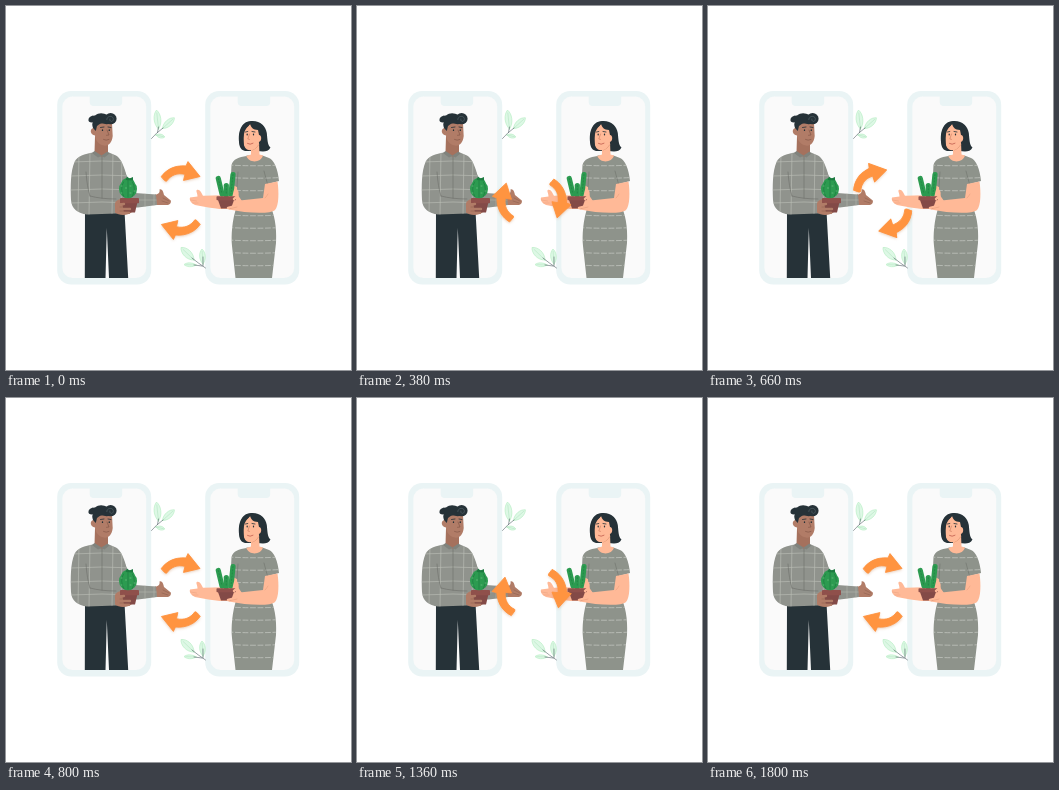
An HTML page with a canvas for the animation above (1820 ms loop, 345 by 364 pixels).

```html
<!DOCTYPE html>
<html lang="en">
<head>
<meta charset="utf-8">
<title>Plant swap</title>
<style>
  html, body { margin: 0; width: 100%; height: 100%; overflow: hidden; background: #fff; }
  canvas { display: block; width: 345px; height: 364px; }
</style>
</head>
<body>
<canvas id="stage"></canvas>
<script>
const W = 345, H = 364;
const LOOP = 1820, SPIN = 800, SECOND = 1000, STEP = 20;
const CX = 174.7, CY = 194.5;
const INK = '#263238', FRAME = '#eaf4f5', SCREEN = '#fafafa', ORANGE = '#ff9440';
const SHIRT = '#90938d', DRESS = '#8e938b', BROWN = '#b17c67', PEACH = '#ffb997';
const BROWN_LINE = '#7f5344', PEACH_LINE = '#e39a78';
const GREEN = '#2c9b50', DARK_GREEN = '#1d7a40', POT = '#834a47', RIM = '#8f504b';

const stage = document.getElementById('stage');
const scale = window.devicePixelRatio || 1;

function setup(canvas) {
  canvas.width = W * scale;
  canvas.height = H * scale;
  const c = canvas.getContext('2d');
  c.scale(scale, scale);
  c.lineCap = c.lineJoin = 'round';
  return c;
}

const view = setup(stage);
const scene = document.createElement('canvas');
const g = setup(scene);

function fill(d, color) {
  g.fillStyle = color;
  g.fill(new Path2D(d));
}

function line(d, color, width = 0.7, dash = []) {
  g.strokeStyle = color;
  g.lineWidth = width;
  g.setLineDash(dash);
  g.stroke(new Path2D(d));
}

function oval(x, y, rx, ry, color) {
  g.fillStyle = color;
  g.beginPath();
  g.ellipse(x, y, rx, ry, 0, 0, Math.PI * 2);
  g.fill();
}

function box(x, y, w, h, r, color) {
  g.fillStyle = color;
  g.beginPath();
  g.roundRect(x, y, w, h, r);
  g.fill();
}

function inside(d, draw) {
  g.save();
  g.clip(new Path2D(d));
  draw();
  g.restore();
}

function phone(x) {
  box(x, 85, 94, 193.5, 14, FRAME);
  box(x + 5.2, 90.5, 83.8, 181.5, 10, SCREEN);
  box(x + 32.5, 88, 32.5, 12, [0, 0, 4, 4], FRAME);
}

function leaf(x, y, length, width, turn) {
  g.save();
  g.translate(x, y);
  g.rotate(turn * Math.PI / 180);
  const d = `M0 0C${-width} ${-length * 0.3} ${-width * 0.8} ${-length * 0.8} 0 ${-length}` +
    `C${width * 0.8} ${-length * 0.8} ${width} ${-length * 0.3} 0 0Z`;
  fill(d, '#ddf8e5');
  line(d, '#b5edc2', 0.6);
  line(`M0 0V${-length * 0.85}`, '#a5dcb4', 0.4);
  g.restore();
}

function sprigs() {
  leaf(152.5, 123, 19, 5, -6);
  leaf(156.5, 122.5, 16, 4.6, 48);
  leaf(150, 129, 9, 2.8, 103);
  line('M145.5 132.5Q150 127 157 122M151.5 126.5L152.5 121', '#56636a', 0.6);
  leaf(188, 254, 18, 5.6, -46);
  leaf(197, 258, 15, 4.2, -4);
  leaf(190, 259, 12, 2.9, -88);
  line('M199.5 262Q192 257 186 252M197 260V251M196 260L188 259', '#56636a', 0.6);
}

function man() {
  fill('M79 205H118.5L122.2 272H103L100.8 222L99.5 272H78.8Z', INK);

  // reaching arm
  fill('M149 188.5C153 188.5 154 186 153.5 183.5C156 182.5 157.5 186 158 189L164.8 194.5C165.5 197 163.5 199.3 160 199L149 199Z', BROWN);
  line('M157 192L163 195M156 195L162 197', BROWN_LINE, 0.4);
  const sleeve = 'M108 149C114 152 117 161 119.5 167L123.5 176L129 187L150 188.5L151 199L132 201.5L114 201Z';
  fill(sleeve, SHIRT);
  inside(sleeve, () => line('M132 194H152M139 186V203M148 186V203', '#b2b5ad', 0.6));

  // torso and bent arm
  const torso = 'M87 146.5C79 148 71 150 68.5 156C64.5 165 64.5 180 65 194C65.5 203 72 207.5 81 208.5L110 207.5L118.5 206.5L119.5 190L121 172C119 162 115 152 110 149.5L103 146.5Z';
  fill(torso, SHIRT);
  inside(torso, () => {
    const rows = [156, 170, 184, 197].map(y => `M64 ${y}Q96 ${y - 2} 128 ${y}`).join('');
    const columns = [73, 84, 107, 116].map(x => `M${x} 144L${x - 1} 210`).join('');
    line(rows + columns, '#babdb5', 0.65);
  });
  line('M96 150V192M80 166Q81 181 84 190M84 190Q95 193 110 193', '#6d706b', 0.6);

  // head
  fill('M89 130L88.5 147C93 151.5 99 151.5 102 147.5V134Z', '#a5715d');
  fill('M87.5 120C90 113 103 113 106 117L106.7 130C106 137 102 140.5 98 139.5C92 138.5 89.5 134 89 129.5C84.5 129 83 123 87.5 122Z', BROWN);
  fill('M82.5 113.5C83 110 87 109.5 89 109.5C93 106 98 107 101 109L104 117.5C99 119.5 96 116 93 118.5L91 120L89.8 125L87 122C86 119 86 117 87 116.5C84 117 82 115.5 82.5 113.5Z', INK);
  oval(104.6, 112.7, 6, 5.6, INK);
  line('M100.8 113.5C101 109 108 109.5 107.3 113.6C106.8 116.3 103.2 115.8 103.8 113', '#5a6a70', 0.6);
  line('M94.5 121.5L98 121M102 121L105 121.5', INK, 0.8);
  oval(96.5, 124.2, 0.7, 0.9, INK);
  oval(103.3, 124.2, 0.7, 0.9, INK);
  line('M101 124L103 129L100.5 129.3M97.5 133.5Q100 135 103 133.5', BROWN_LINE, 0.6);
  fill('M86 147L88.5 145L95.5 149.5L101.5 145.5L103.5 147.5L98.5 151.5L95.5 150L92 151.5Z', '#80837d');

  // cactus and hand
  fill('M109 197C111 193 116 192 119 194L127 205C123 210 113 210 109 206.5Z', BROWN);
  fill('M116 196H131.5L129 206.5H118Z', POT);
  box(114, 192, 19, 5.2, 0.8, RIM);
  oval(122, 183, 9, 9.3, GREEN);
  oval(122, 177, 6.5, 5, GREEN);
  line('M122 174V191M117.5 176Q113.5 183 118 191M126.5 176Q130.5 183 126 191', DARK_GREEN, 0.7);
  line('M115 180H116M119.5 182H120.5M124 180H125M128 185H129M115 187H116M124 187H125', '#80c890', 0.6);
  fill('M119.5 174L121 170.5L123.5 172.5L127 171L127 174.5Z', DARK_GREEN);
  line('M110 199L118 198M112 203L124 203M114 206.8L123 206.8', BROWN, 2.4);
  line('M114 201H122M114 205H123', BROWN_LINE, 0.4);
}

function woman() {
  // hair behind the face
  fill('M234 141C231 129 234 117 243 115.3C253 113.5 259.5 119 260.8 127C261.5 134 261.5 139 264.5 141.5C263 144.5 260 145.5 257 145.5L251 145H239C236 144 235 143 234 141Z', INK);

  // reaching arm
  fill('M226 176L236 178L235 200C226 205 210 203 197 200.5L189 199C185.5 197.5 183 194.5 184 191.5L191.5 190.5C191.5 187 189.5 185 191 183.8C194 183 195.5 187 197 189.8L226 189Z', PEACH);
  line('M184.5 194L190.5 195M186.5 197L192 197', PEACH_LINE, 0.4);

  const dress = 'M240.5 150C233 151 227 153 225.5 159L224.5 178L231 181V200C226 213 225 230 226 240L229.5 272H266L270 237C271 220 268 207 264 200L262 178L273 175C272 163 268 154 263 152L256.5 149.5H240.5Z';
  fill(dress, DRESS);
  inside(dress, () => {
    for (let y = 159; y < 270; y += 12.5)
      line(`M222 ${y}Q248 ${y + 1.5} 275 ${y}`, '#c8cbc4', 0.7, [5, 2.5]);
    line('M231 181L232 166M262 180L258 165M232 203Q248 207 264 201', '#6f736c', 0.6);
  });

  // neck and face
  fill('M245 138L253 136L253.5 148.5L257 149.5C255 157 243 157.5 240.3 150L245 148.5Z', PEACH);
  line('M246.5 144Q250 143 252.5 139', PEACH_LINE, 1);
  fill('M238 122C236.5 130 236 140 241 143.5C246 146 251.5 142 252.8 136C256 135.5 256 129 253 129L252 124C247 124 245 121 244 118C242 121 240 122 238 122Z', PEACH);
  fill('M234 140C232 130 234 119 241 117L244 118C241 121 238.5 124 238 128C237.3 133 238 139 238 143.5Z', INK);
  line('M239.5 126L241.8 125.5M246 125.5L249 126', INK, 0.8);
  oval(241.2, 128.5, 0.65, 0.9, INK);
  oval(247.5, 128.5, 0.65, 0.9, INK);
  line('M243.5 128L241.8 133L243.5 133.4', '#c9785c', 0.6);
  line('M241.5 137.5Q244 139.2 247 137.3', '#b84f43', 0.7);

  // cacti and holding arm
  const cacti = ['M212.3 172.5L216 188', 'M220.3 179.5V189', 'M227 168.5L225 188'];
  cacti.forEach(d => line(d, GREEN, 5.2));
  cacti.forEach(d => line(d, DARK_GREEN, 0.6, [1.2, 2]));
  fill('M259 178L271.5 175.5C273 186 273 200 269 204C264 208.5 240 207 223 203.5L221 200L229 195L257 192Z', PEACH);
  fill('M228 183.5C231 181.5 233.5 185 232.5 190L236 195L229 197L226 192Z', PEACH);
  fill('M212 194H228L225 202.5H215Z', POT);
  box(210.5, 190.3, 19.5, 4, 0.8, RIM);
  line('M222 202L230 200M228 193L231.5 190', PEACH, 2.4);
  line('M259 192Q261 190 262 188M223 203L231 201', PEACH_LINE, 0.5);
}

const arrow = new Path2D(
  'M155.3 170.5C160 164 168 159 180 160L182 155.6L194 170.5L177.5 174.4L179 168.3' +
  'C171 166.5 165 169 160.5 175.2Q159 175.5 157.5 173.3Z');

function arrows(angle) {
  view.fillStyle = view.strokeStyle = ORANGE;
  view.lineWidth = 0.9;
  for (const turn of [0, Math.PI]) {
    view.save();
    view.translate(CX, CY);
    view.rotate(angle + turn);
    view.translate(-CX, -CY);
    view.shadowColor = 'rgba(190,115,60,.4)';
    view.shadowBlur = 3 * scale;
    view.shadowOffsetY = 1.2 * scale;
    view.fill(arrow);
    view.shadowColor = 'transparent';
    view.stroke(arrow);
    view.restore();
  }
}

// two linear half turns with a pause between them
function angleAt(t) {
  const start = t < SECOND ? 0 : SECOND;
  return Math.PI * Math.min(1, (t - start) / SPIN);
}

g.fillStyle = '#fff';
g.fillRect(0, 0, W, H);
phone(51.2);
phone(199.2);
sprigs();
man();
woman();

const begin = performance.now();
function frame() {
  const t = (performance.now() - begin) % LOOP;
  view.drawImage(scene, 0, 0, W, H);
  arrows(angleAt(Math.floor(t / STEP) * STEP));
  requestAnimationFrame(frame);
}
frame();
</script>
</body>
</html>
```
